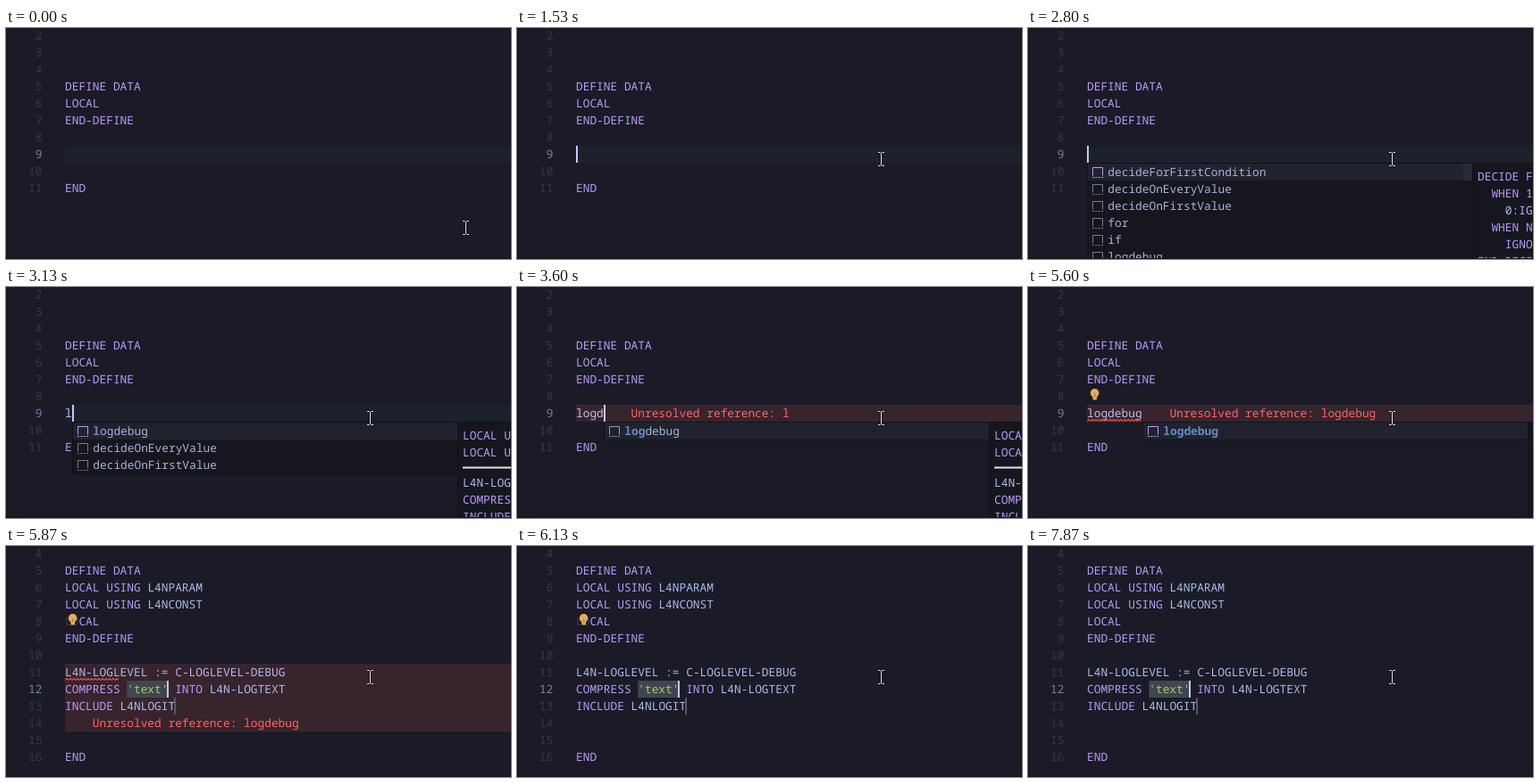
An HTML page that plays this animation: 565 by 259 pixels, repeating every 8000 ms.

```html
<!DOCTYPE html>
<html lang="en">
<head>
<meta charset="utf-8">
<title>Snippet completion in a code editor</title>
<style>
html, body { margin: 0; width: 100%; height: 100%; overflow: hidden; background: #1a1b26; }
svg { display: block; width: 565px; height: 259px; }
text {
  font: 12.83px "Noto Sans Mono", "DejaVu Sans Mono", monospace;
  white-space: pre;
  text-rendering: geometricPrecision;
}
</style>
</head>
<body>
<svg id="stage" viewBox="0 0 565 259"></svg>
<script>
const LOOP = 8000, CH = 7.698, ROW = 19, LEFT = 66, TYPE_ROW = 132;
const C = {
  bg: '#1a1b26', line: '#1c212c', num: '#34384f', numOn: '#787fa6',
  key: '#bb9af7', id: '#acbaeb', str: '#9ece6a', err: '#ff6464', errBg: '#38242d',
  caret: '#c0caf5', panel: '#16161e', edge: '#101116', pick: '#20232e',
  item: '#a9b1d6', match: '#668ac4', icon: '#777b8c', sel: '#42454f', bulb: '#e5ac5a'
};
const KEYS = /^(DEFINE|DATA|LOCAL|USING|END-DEFINE|END|COMPRESS|INTO|INCLUDE|DECIDE|WHEN|IGNORE|FOR|FIRST|NONE|END-DECIDE)$/;

const BEFORE = { first: 2, lines: ['', '', '', 'DEFINE DATA', 'LOCAL', 'END-DEFINE', '', '', '', 'END'] };
const AFTER = {
  first: 4,
  lines: ['', 'DEFINE DATA', 'LOCAL USING L4NPARAM', 'LOCAL USING L4NCONST', 'LOCAL', 'END-DEFINE', '',
    'L4N-LOGLEVEL := C-LOGLEVEL-DEBUG', "COMPRESS 'text' INTO L4N-LOGTEXT", 'INCLUDE L4NLOGIT', '', '', 'END']
};
const ALL = ['decideForFirstCondition', 'decideOnEveryValue', 'decideOnFirstValue', 'for', 'if', 'logdebug'];
const DECIDE_DOC = ['DECIDE FOR', '  WHEN 1', '    0:IGNORE', '  WHEN NONE', '    IGNORE', 'END-DECIDE'];
const LOG_DOC = [['LOCAL USING', 'LOCAL USING'], ['L4N-LOGLEVEL', 'COMPRESS', 'INCLUDE']];

// Latest entry of a [time, value] list
const at = (list, t) => list.reduce((v, [from, next]) => t >= from ? next : v, list[0][1]);
const TYPED = [[0, 0], [3070, 1], [3270, 2], [3530, 3], [3600, 4], [3670, 5], [3870, 6], [3930, 7], [4070, 8]];
const MATCHED = [[0, 1], [3330, 2], [3530, 3], [3670, 5], [3870, 6], [3930, 7], [4070, 8]];
const MESSAGE = [[0, 0], [3330, 1], [3930, 5], [4400, 8]];
const SQUIGGLE = [[0, 0], [3930, 5], [4330, 8]];
const CARET = [[0, 0], [530, 1], [1070, 0], [1530, 1], [2070, 0], [2530, 1], [4600, 0], [5070, 1],
  [5600, 0], [5870, 1], [6330, 0], [6870, 1], [7330, 0], [7870, 1]];

const rect = (x, y, w, h, fill, more = '') =>
  `<rect x="${x}" y="${y}" width="${w}" height="${h}" fill="${fill}" ${more}/>`;
const text = (x, y, s, fill, more = '') => `<text x="${x}" y="${y}" fill="${fill}" ${more}>${s}</text>`;
const path = (d, stroke, more = '') => `<path d="${d}" fill="none" stroke="${stroke}" ${more}/>`;

function color(word) {
  if (word[0] === "'") return C.str;
  return KEYS.test(word) ? C.key : C.id;
}

function code(x, y, s) {
  if (!s) return '';
  const spans = s.replace(/\S+/g, w => `<tspan fill="${color(w)}">${w}</tspan>`);
  return text(x, y, spans, C.id);
}

function buffer({ first, lines }, active) {
  return lines.map((s, i) => {
    const n = first + i, y = -1 + i * ROW + 14;
    return text(40.4, y, n, n === active ? C.numOn : C.num, 'text-anchor="end"') + code(LEFT, y, s);
  }).join('');
}

function squiggle(chars) {
  if (!chars) return '';
  let d = `M${LEFT} 150.5`;
  for (let x = 2, up = true; x <= chars * CH; x += 2, up = !up) d += `L${LEFT + x} ${up ? 148.3 : 150.5}`;
  return path(d, '#e5484d', 'stroke-width="1.1"');
}

function bulb(y) {
  return rect(66, y, 15.5, 18, C.bg, 'opacity=".8"') +
    `<circle cx="74.6" cy="${y + 5.9}" r="4.8" fill="${C.bulb}"/>` +
    rect(72.4, y + 9, 4.6, 4.6, C.bulb, 'rx="1"') +
    rect(74.1, y + 6.5, 1.2, 3.5, '#a67a3e');
}

const caret = x => rect(x, 0, 2, ROW, C.caret);

function icon(x, y, stroke) {
  return path(`M${x + .5} ${y + 9.5}V${y + .5}H${x + 11.5}V${y + 9.5}`, stroke) +
    path(`M${x} ${y + 11.5}H${x + 12}`, stroke, 'stroke-dasharray="2 1.3"');
}

function list(x, items, matched, iconOn) {
  const h = items.length * ROW + 2;
  const rows = items.map((name, i) => {
    const y = 152 + i * ROW;
    const hit = name.startsWith('logdebug') ? matched : 0;
    const label = hit
      ? `<tspan fill="${C.match}" font-weight="600">${name.slice(0, hit)}</tspan>${name.slice(hit)}`
      : name;
    return (i ? '' : rect(x + 1, y, 430, ROW, C.pick)) +
      icon(x + 6, y + 4, i ? C.icon : iconOn) + text(x + 23.3, y + 14, label, C.item);
  }).join('');
  return rect(x, 151, 432, h, C.edge) + rect(x + 1, 152, 430, h - 2, C.panel) + rows;
}

const docPanel = x => rect(x, 151, 300, 120, C.edge) + rect(x + 1, 152, 300, 120, C.panel);
const docLines = (x, y, lines) => lines.map((s, i) => code(x + 6, y + i * ROW, s)).join('');

function suggest(t, typed) {
  if (t < 2670) return '';
  if (t < 3130) {
    const x = LEFT + Math.round(typed * CH);
    const doc = x + 431;
    return list(x, ALL, 0, C.key) +
      rect(x + 421, 152, 10, ROW, '#292b36') +
      (t >= 2730 ? docPanel(doc) : '') +
      (t >= 2800 ? docLines(doc, 170.5, DECIDE_DOC) : '');
  }
  const x = LEFT + Math.round(typed * CH);
  const items = t < 3330 ? ['logdebug', 'decideOnEveryValue', 'decideOnFirstValue'] : ['logdebug'];
  const fresh = t >= 3530 && t < 3670;
  const doc = x + 431;
  return list(x, items, at(MATCHED, t), fresh ? '#8a9ea4' : C.key) + docPanel(doc) +
    docLines(doc, 170.5, LOG_DOC[0]) + rect(doc + 6, 201.5, 100, 2, '#e6e6ea') +
    docLines(doc, 224, LOG_DOC[1]);
}

const errorText = (x, y, n) =>
  text(x + 4 * CH, y, 'Unresolved reference: ' + 'logdebug'.slice(0, n), C.err);

function typing(t) {
  const typed = at(TYPED, t), msg = at(MESSAGE, t), end = LEFT + typed * CH;
  return rect(LEFT, TYPE_ROW, 499, ROW, msg ? C.errBg : C.line) +
    buffer(BEFORE, 9) +
    (typed ? text(LEFT, 146, 'logdebug'.slice(0, typed), '#b9c2e8') : '') +
    (msg ? errorText(end, 146, msg) : '') +
    squiggle(at(SQUIGGLE, t)) +
    (t >= 4600 ? bulb(113) : '') +
    suggest(t, typed) +
    (at(CARET, t) ? `<g transform="translate(0 ${TYPE_ROW})">${caret(Math.round(end))}</g>` : '');
}

function inserted(t) {
  const stale = t < 6130;
  return (stale ? rect(LEFT, TYPE_ROW, 499, ROW * 4, C.errBg) : '') +
    rect(LEFT + 9 * CH, 151, 6 * CH, ROW, C.sel) +
    buffer(AFTER, 12) +
    (stale ? errorText(LEFT, 203, 8) : '') +
    (t < 6070 ? squiggle(8) : '') +
    rect(188, 170, 2, ROW, '#565963') +
    (t < 6330 ? bulb(75) : '') +
    (at(CARET, t) ? `<g transform="translate(0 151)">${caret(180)}</g>` : '');
}

// Pointer position, sampled at 15 steps a second
function pointer(t) {
  if (t >= 930) return [407, 147];
  if (t >= 870) return [406, 145];
  const p = Math.min(1, Math.floor((t + 1) / 66.7) / 6);
  const e = p * p * (3 - 2 * p);
  return [Math.round(514 - 110 * e), Math.round(224 - 82 * e)];
}

function beam([x, y]) {
  const d = `M${x - 3} ${y - 7.5}h2.5l1 1l1 -1h2.5M${x + .5} ${y - 7}v14M${x - 3} ${y + 7.5}h2.5l1 -1l1 1h2.5`;
  return path(d, '#08080c', 'stroke-width="2.4" opacity=".5"') + path(d, '#e2e2e2');
}

function scene(t) {
  return rect(0, 0, 565, 259, C.bg) +
    (t < 5870 ? typing(t) : inserted(t)) +
    rect(0, 258, 565, 1, '#15151d') +
    beam(pointer(t));
}

const stage = document.getElementById('stage');
let shown = '';
function draw(t) {
  const next = scene(t);
  if (next !== shown) stage.innerHTML = shown = next;
}

const start = performance.now();
function tick() {
  draw((performance.now() - start) % LOOP);
  requestAnimationFrame(tick);
}
tick();
</script>
</body>
</html>
```
